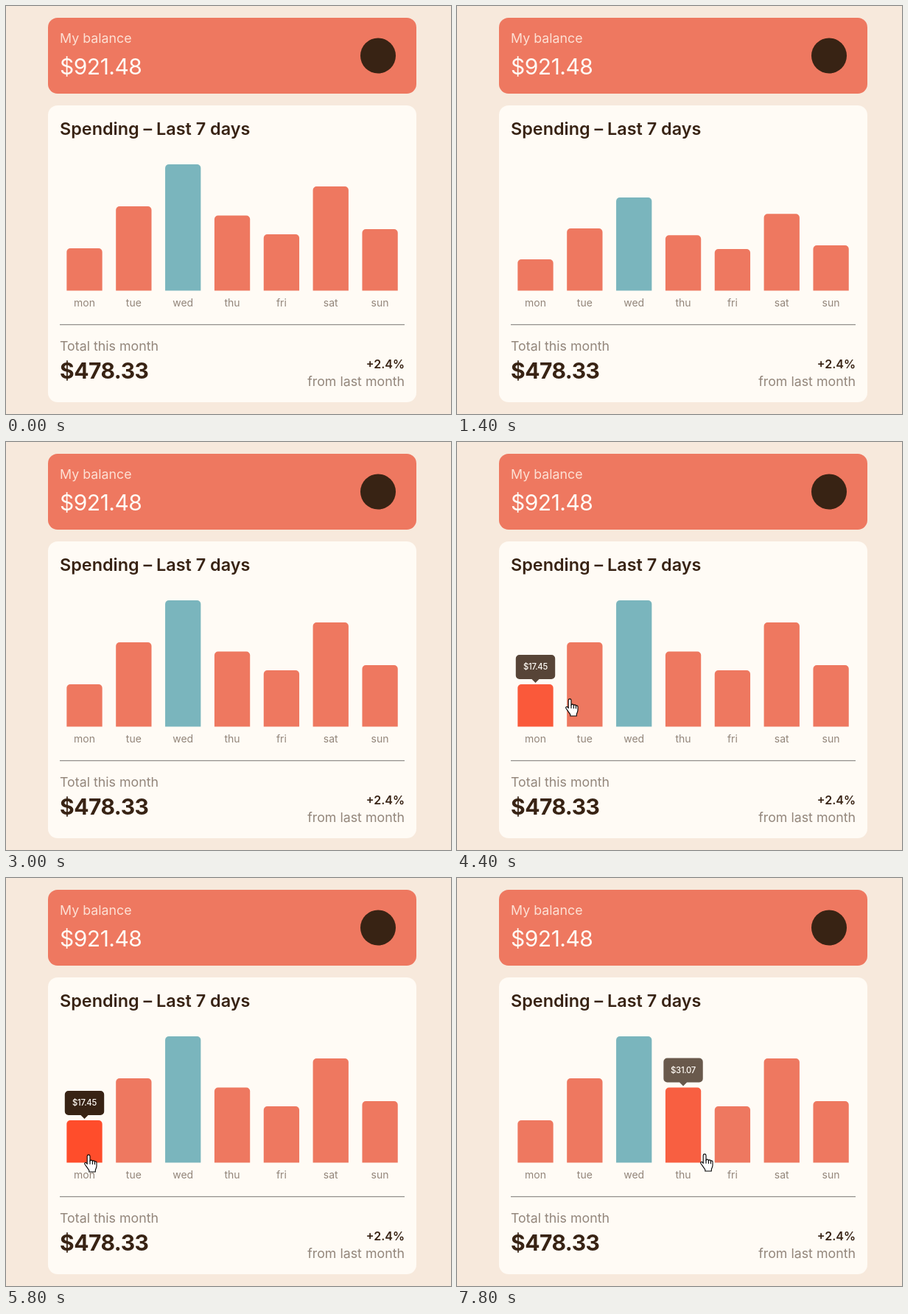
These frames come from a looping animation (604x554 px, 8000 ms). An HTML page:

```html
<!DOCTYPE html>
<html lang="en">
<head>
<meta charset="utf-8">
<title>Spending chart</title>
<style>
  html, body { margin: 0; width: 100%; height: 100%; overflow: hidden; background: #f7e9dc; }
  svg { display: block; width: 100%; height: 100%; }
  text { font-family: Inter, "Open Sans", sans-serif; font-size: 17.8px; fill: #382314; }
  .muted { fill: #93867b; }
  .right { text-anchor: end; }
  .amount { font-size: 30px; letter-spacing: -.5px; }
  .label { font-size: 14px; text-anchor: middle; }
  #tip text { font-size: 11.3px; font-weight: 500; letter-spacing: -.3px; text-anchor: middle; fill: #fffbf5; }
</style>
</head>
<body>
<svg viewBox="0 0 604 554">
  <rect width="604" height="554" fill="#f7e9dc"/>
  <rect x="57" y="16" width="500" height="103" rx="13" fill="#ee7860"/>
  <text x="73" y="50" style="fill:#fde0d4">My balance</text>
  <text x="73" y="93" class="amount" style="fill:#fffbf5">$921.48</text>
  <circle cx="505" cy="67.5" r="24" fill="#382314"/>

  <rect x="57" y="135" width="500" height="403" rx="13" fill="#fffbf5"/>
  <text x="73" y="175" style="font-size:23.4px;font-weight:600">Spending – Last 7 days</text>
  <g id="chart"></g>
  <rect x="73" y="432" width="468" height="1.3" fill="#969390"/>
  <text x="73" y="468" class="muted">Total this month</text>
  <text x="73" y="506" class="amount" style="font-weight:700">$478.33</text>
  <text x="541" y="492" class="right" style="font-size:16px;font-weight:600">+2.4%</text>
  <text x="541" y="516" class="muted right">from last month</text>

  <g id="tip">
    <path d="M-21.7 -38h43.4a5 5 0 0 1 5 5v23a5 5 0 0 1 -5 5H5L0 0L-5 -5H-21.7a5 5 0 0 1 -5 -5v-23a5 5 0 0 1 5 -5z" fill="#382314"/>
    <text y="-18"></text>
  </g>
  <g id="hand" stroke="#000" stroke-width="1.1" stroke-linejoin="round" stroke-linecap="round">
    <path fill="#fff" d="M-1.8 12.5V1.8a1.9 1.9 0 0 1 3.8 0V8.2a1.8 1.8 0 0 1 3.4 .3a1.7 1.7 0 0 1 3 .7a1.6 1.6 0 0 1 2.6 1.3V15c0 3-1.7 4-1.7 6v2H.8v-2c-1.5-2.4-3.5-5-5.8-8.2c-1.2-2 1.2-3.2 2.6-1.4z"/>
    <path fill="none" d="M2 8.2v4M5.4 8.5v4M8.4 9.2v3.5"/>
  </g>
</svg>
<script>
const LOOP = 8000, STEP = 200;
const BASE = 386.5, BAR_WIDTH = 48.3;
const RELOAD = 1000, GROW_START = 1116, GROW_TIME = 1000;
const CORAL = [238, 120, 96], CORAL_HOT = [255, 77, 43];
const CYAN = [122, 181, 189], CYAN_HOT = [180, 224, 229];

const bars = [
  ["mon", 329, "$17.45"], ["tue", 272, "$34.91"], ["wed", 215, "$52.36"], ["thu", 284.5, "$31.07"],
  ["fri", 310, "$23.39"], ["sat", 245, "$43.28"], ["sun", 303, "$25.48"]
].map(([day, top, price], i) => ({ day, top, price, x: 106.5 + 66.85 * i }));

// [time, hovered bar], -1 for none
const hovers = [[3740, 0], [4369, -1], [4410, 1], [5215, -1], [5260, 0], [5950, -1], [6340, 3], [7750, -1]];

// [time, x, y] of the fingertip
const pointer = [
  [3740, 108, 360], [4000, 112, 352], [4300, 128, 350], [4400, 153, 349], [4600, 172, 350],
  [4900, 168, 352], [5200, 144, 351], [5400, 118, 356], [5800, 112, 376], [6000, 150, 422],
  [6200, 290, 412], [6400, 325, 379], [6700, 318, 366], [7500, 314, 370], [7800, 336, 375]
];

const $ = selector => document.querySelector(selector);
const clamp = v => Math.max(0, Math.min(1, v));
const mix = (a, b, p) => a + (b - a) * p;
const easeOutQuart = p => 1 - (1 - clamp(p)) ** 4;

function add(tag, attrs) {
  const el = document.createElementNS("http://www.w3.org/2000/svg", tag);
  for (const name in attrs) el.setAttribute(name, attrs[name]);
  return $("#chart").appendChild(el);
}

for (const bar of bars) {
  bar.el = add("path", {});
  add("text", { x: bar.x, y: 408, class: "label muted" }).textContent = bar.day;
}

function barPath(x, height) {
  if (height <= 0) return "";
  const r = Math.min(5, height), w = BAR_WIDTH;
  return `M${x - w / 2} ${BASE}v${r - height}a${r} ${r} 0 0 1 ${r} ${-r}h${w - 2 * r}` +
    `a${r} ${r} 0 0 1 ${r} ${r}v${height - r}z`;
}

// Replays the hovers up to time t; each one starts from the state the last had reached.
function hoverState(t) {
  let state = { x: bars[0].x, y: bars[0].top - 2, opacity: 0, heat: bars.map(() => 0), price: "" };
  hovers.forEach(([start, index], i) => {
    if (t < start) return;
    const end = Math.min(t, hovers[i + 1]?.[0] ?? LOOP);
    const eased = easeOutQuart((end - start) / 400);
    const fade = (end - start) / 200;
    const target = bars[index];
    state = {
      x: target ? mix(state.x, target.x, eased) : state.x,
      y: target ? mix(state.y, target.top - 2, eased) : state.y,
      opacity: clamp(state.opacity + (target ? fade : -fade)),
      heat: state.heat.map((h, b) => mix(h, b === index ? 1 : 0, eased)),
      price: target ? target.price : state.price
    };
  });
  return state;
}

function pointerAt(t) {
  const next = pointer.findIndex(p => p[0] > t);
  if (next === 0) return null;
  if (next < 0) return pointer[pointer.length - 1].slice(1);
  const [t0, x0, y0] = pointer[next - 1], [t1, x1, y1] = pointer[next];
  const p = (t - t0) / (t1 - t0);
  return [mix(x0, x1, p), mix(y0, y1, p)];
}

function draw(t) {
  const scale = t < RELOAD ? 1 : easeOutQuart((t - GROW_START) / GROW_TIME);
  const hover = hoverState(t);
  bars.forEach((bar, i) => {
    const [cool, hot] = bar.day === "wed" ? [CYAN, CYAN_HOT] : [CORAL, CORAL_HOT];
    bar.el.setAttribute("d", barPath(bar.x, (BASE - bar.top) * scale));
    bar.el.setAttribute("fill", `rgb(${cool.map((c, k) => Math.round(mix(c, hot[k], hover.heat[i])))})`);
  });

  $("#tip").setAttribute("transform", `translate(${hover.x} ${hover.y})`);
  $("#tip").setAttribute("opacity", hover.opacity);
  $("#tip text").textContent = hover.price;

  const tip = pointerAt(t);
  $("#hand").setAttribute("visibility", tip ? "visible" : "hidden");
  if (tip) $("#hand").setAttribute("transform", `translate(${tip})`);
}

const began = performance.now();
function tick() {
  const step = Math.floor((performance.now() - began) / STEP + 0.02);
  draw(step * STEP % LOOP);
  requestAnimationFrame(tick);
}
tick();
</script>
</body>
</html>
```
